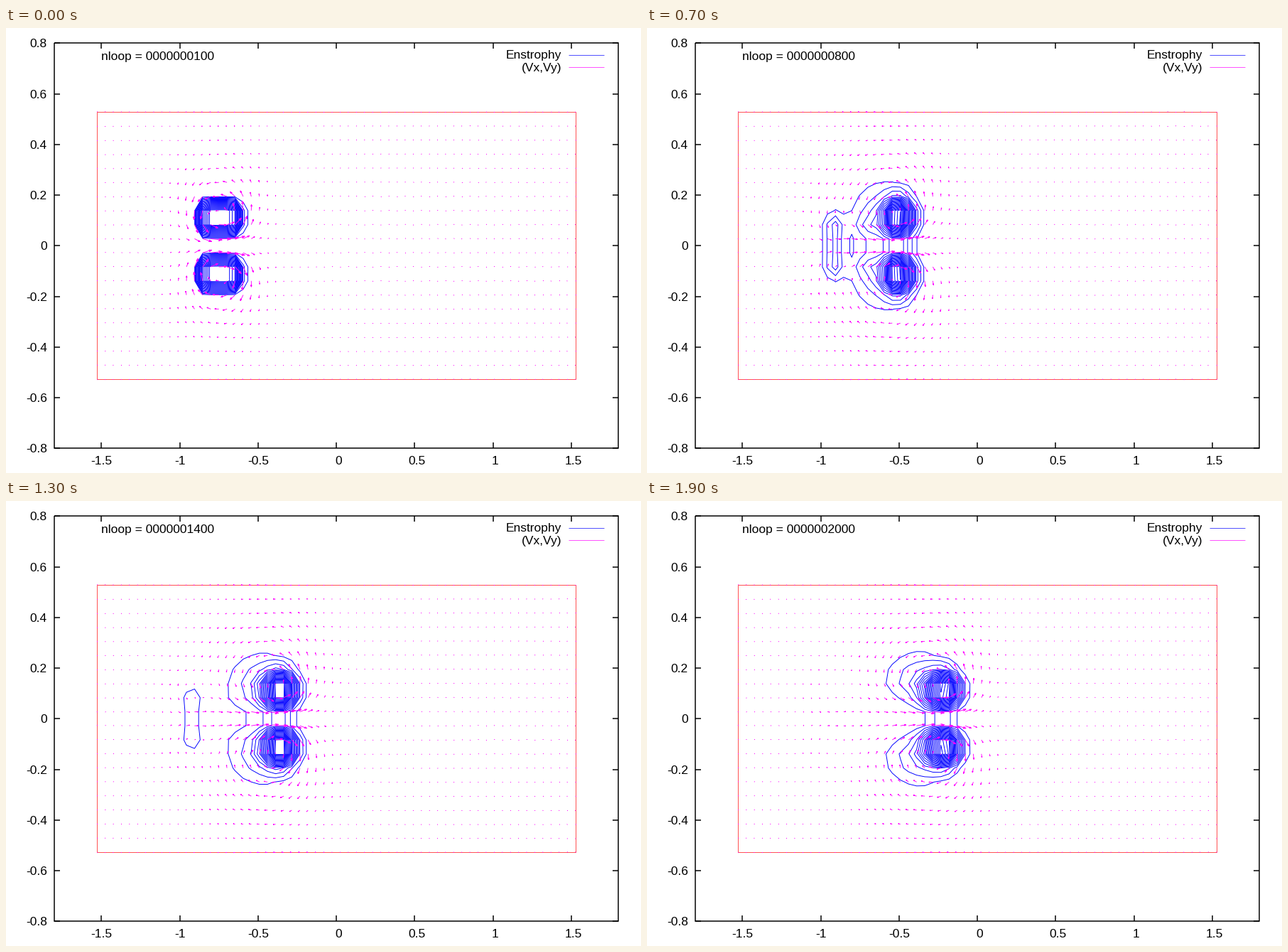
A matplotlib script for the animation above (2000 ms loop, 894 px wide and 626 px high).

```python
import numpy as np
import matplotlib.pyplot as plt
from matplotlib.animation import FuncAnimation
from matplotlib.collections import LineCollection

W, H, DPI = 894, 626, 100
FRAMES, INTERVAL = 20, 100
NX, NY = 60, 20
LX, LY = 3.0, 1.0
SX, SY = 794.3 / 3.6, 570 / 1.6
LONGEST = 17
SCREEN = 6.5          # the flow fades beyond 1 / SCREEN
LEVELS = 0.05 * np.arange(1, 25)
PT = 72 / DPI
FONT = 17.4 * PT

plt.rcParams["font.family"] = "Liberation Sans"


def px(x):
    return 68 + (x + 1.8) * SX


def py(y):
    return 306.3 - y * SY


# cell centres, with one ghost cell on each side
xg = -LX / 2 + (np.arange(NX) - 0.5) * LX / (NX - 2)
yg = -LY / 2 + (np.arange(NY) - 0.5) * LY / (NY - 2)
X, Y = np.meshgrid(px(xg), py(yg))
R = np.abs(Y - py(0))
SIGN = np.sign(yg)[:, None]

# sine modes for the stream function
kx = np.arange(1, NX - 2) * np.pi / LX
ky = np.arange(1, NY - 2) * np.pi / LY
arg_x, arg_y = np.outer(xg + LX / 2, kx), np.outer(yg + LY / 2, ky)
sin_x, cos_x, sin_y, cos_y = (np.sin(arg_x), np.cos(arg_x),
                              np.sin(arg_y), np.cos(arg_y))
K2 = ky[:, None] ** 2 + kx[None, :] ** 2 + SCREEN ** 2


def bump(d, low, high, power=2):
    """Bell curve with its own width on either side of zero."""
    return np.exp(-(np.abs(d) / np.where(d < 0, low, high)) ** power)


def enstrophy(t):
    box = np.exp(-t)                      # the starting block rolls up
    grown = 1 - box
    lift = 1 / (1 + np.exp(13 - t))       # the halo leaves the axis

    core_x = 301 + 5.2 * t + 18 * (1 - np.exp(-t / 3))
    core_in = 19 + 2.5 * box + 5 * grown * np.exp(-t / 6)
    core = (bump(X - core_x, 14 + 0.5 * t + 15 * box,
                 17 + 0.13 * t + 12 * box, 2 + 4 * box)
            * bump(R - 39.6, core_in, 19.6 + 1.9 * box, 2 + 1.9 * box))

    halo = (bump(X - core_x + 5 + 1.5 * t, 45, 38)
            * bump(R - 44 - 10 * lift, 54 - 25 * lift, 43 - 6 * lift))

    wake = bump(X - 303 - t, 18, 18) * bump(R - 27, 18, 18)

    rest_w = 8 + 0.7 * t
    rest = (bump(X - 265 + 0.25 * t, rest_w, rest_w)
            * bump(R - 17 - 0.6 * t, 26, 26, 4))

    return core / core.max() + grown * (
        0.155 * halo + 0.9 * np.exp(-t / 3) * wake
        + 0.285 * np.exp(-(t / 11) ** 1.6) * rest)


def velocity(e):
    """Flow induced by the vorticity inside the walls."""
    vort = SIGN * np.sqrt(e)
    amp = sin_y[1:-1].T @ vort[1:-1, 1:-1] @ sin_x[1:-1] / K2
    u = (cos_y * ky) @ amp @ sin_x.T
    v = -sin_y @ amp @ (cos_x * kx).T
    return u, v


def arrows(e):
    u, v = velocity(e)
    dx, dy = u * SX, -v * SY
    size = np.hypot(dx, dy)
    unit = np.stack([dx, dy], -1) / np.maximum(size, 1e-12)[..., None]
    length = np.maximum(size / size.max() * LONGEST, 0.6)[..., None]
    tail = np.stack([X, Y], -1)
    tip = tail + unit * length
    back = tip - unit * length * 0.3
    side = np.stack([-unit[..., 1], unit[..., 0]], -1) * length * 0.1
    path = np.stack([tail, tip, back + side, tip, back - side], -2)
    return path.reshape(-1, 5, 2)


fig = plt.figure(figsize=(W / DPI, H / DPI), dpi=DPI, facecolor="white")
ax = fig.add_axes([0, 0, 1, 1])
ax.set_xlim(0, W)
ax.set_ylim(H, 0)
ax.axis("off")


def label(x, y, s, ha="left"):
    return ax.text(x, y, s, ha=ha, va="baseline", fontsize=FONT, color="black")


def line(xs, ys, color="black", width=1.5, z=5):
    ax.plot(xs, ys, color=color, lw=width * PT, zorder=z,
            solid_capstyle="butt", solid_joinstyle="miter")


def rect(x0, x1, y0, y1, *style):
    line([x0, x1, x1, x0, x0], [y0, y0, y1, y1, y0], *style)


left, right, top, bottom = px(-1.8), px(1.8), py(0.8), py(-0.8)
rect(left, right, top, bottom)
rect(px(xg[0]), px(xg[-1]), py(yg[0]), py(yg[-1]), "#ff4040", 0.9, 2)

for i in range(-3, 4):
    x = px(i / 2)
    line([x, x], [bottom, bottom - 8])
    line([x, x], [top, top + 8])
    label(x + (3 if i >= 0 else 0), 614.5, f"{i / 2:g}", "center")
for i in range(-4, 5):
    y = py(i / 5)
    line([left, left + 8], [y, y])
    line([right, right - 8], [y, y])
    label(58, y + 6, f"{i / 5:g}", "right")

for y, name, color in [(37.5, "Enstrophy", "#4040ff"),
                       (54.8, "(Vx,Vy)", "#ff40ff")]:
    label(782, y + 6, name, "right")
    line([792, 842], [y, y], color, 0.9)

counter = label(134, 45, "")
rings = LineCollection([], colors="#0000ff", linewidths=0.95 * PT, zorder=3)
flow = LineCollection([], colors="#ff00ff", linewidths=0.9 * PT, zorder=4,
                      joinstyle="bevel", capstyle="butt")
for lines in (rings, flow):
    lines.set_snap(False)
    ax.add_collection(lines, autolim=False)


def update(k):
    e = enstrophy(k)
    cs = ax.contour(X, Y, e, levels=LEVELS[LEVELS < e.max()])
    rings.set_segments([s for group in cs.allsegs for s in group if len(s) > 1])
    cs.remove()
    flow.set_segments(arrows(e))
    counter.set_text(f"nloop = {100 * (k + 1):010d}")
    return rings, flow, counter


def init():
    return update(0)


anim = FuncAnimation(fig, update, frames=FRAMES, init_func=init,
                     interval=INTERVAL, repeat=True, repeat_delay=0)
plt.show()
```
